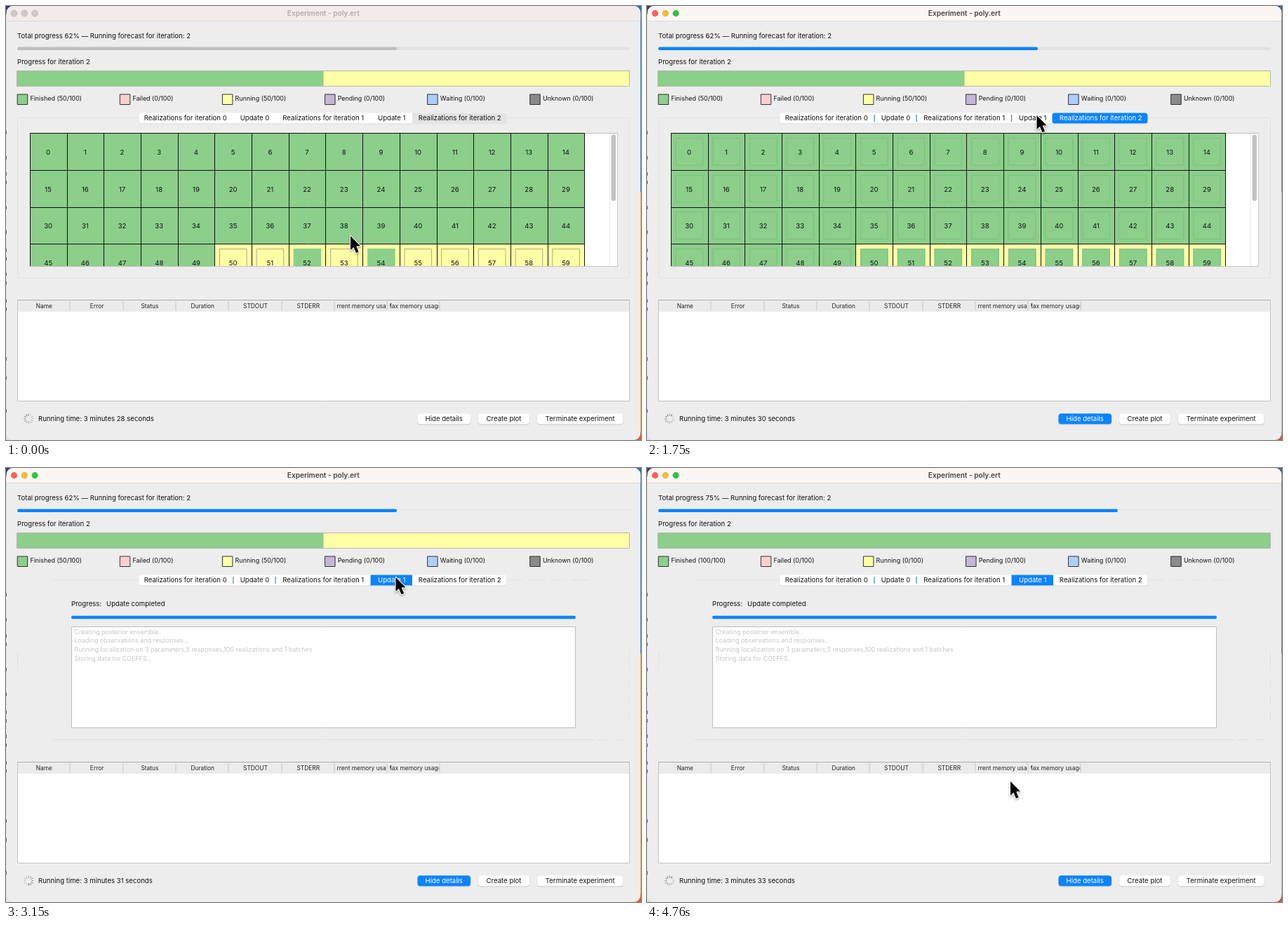
An HTML page with a canvas for the animation above (4.83 s loop, 905 by 619 pixels).

```html
<!DOCTYPE html>
<html lang="en">
<head>
<meta charset="utf-8">
<title>Experiment - poly.ert</title>
<style>
html, body { margin: 0; width: 100%; height: 100%; overflow: hidden; }
canvas { display: block; }
</style>
</head>
<body>
<canvas id="stage" width="905" height="619"></canvas>
<script>
const ctx = document.getElementById('stage').getContext('2d');
const LOOP = 4830, STEP = 70;
const ACTIVATE = 1680, TAB_CLICK = 1820, FINISH = 3290;
const GREEN = '#8bcf8b', YELLOW = '#ffffa5', BLUE = '#0b84fc', BODY = '#ededed';

function fill(x, y, w, h, color, radius = 0) {
  ctx.fillStyle = color;
  ctx.beginPath();
  ctx.roundRect(x, y, w, h, radius);
  ctx.fill();
}

function frame(x, y, w, h, color, radius = 0) {
  ctx.strokeStyle = color;
  ctx.lineWidth = 1;
  ctx.beginPath();
  ctx.roundRect(x, y, w, h, radius);
  ctx.stroke();
}

function line(x1, y1, x2, y2, color, width = 1) {
  ctx.strokeStyle = color;
  ctx.lineWidth = width;
  ctx.beginPath();
  ctx.moveTo(x1, y1);
  ctx.lineTo(x2, y2);
  ctx.stroke();
}

function text(str, x, y, { size = 9.6, align = 'left', color = '#111', weight = 400 } = {}) {
  ctx.font = `${weight} ${size}px Inter, sans-serif`;
  ctx.textAlign = align;
  ctx.fillStyle = color;
  ctx.fillText(str, x, y);
}

function clipped(x, y, w, h, draw) {
  ctx.save();
  ctx.beginPath();
  ctx.rect(x, y, w, h);
  ctx.clip();
  draw();
  ctx.restore();
}

function drawWindow(active) {
  fill(0, 0, 905, 619, '#dfe0e4');
  fill(0, 0, 12, 12, '#3d3c66');
  fill(893, 0, 12, 265, '#2d6da8');
  fill(893, 265, 12, 354, '#e8a04a');
  fill(893, 607, 12, 12, '#d9572f');
  for (const y of [180, 216, 239, 251, 287, 322, 348, 360, 382, 395, 420, 432, 503, 530, 577])
    fill(0, y - 2, 1, 5, '#444');
  fill(0.8, 0, 903.4, 619, BODY, 9);
  fill(0.8, 0, 903.4, 21.5, active ? '#fbf5f3' : '#f3ebea', [9, 9, 0, 0]);
  line(1, 21.5, 904, 21.5, active ? '#dcd8d7' : '#dedad9');

  ['#fe5f57', '#febb2e', '#28c840'].forEach((color, i) => {
    ctx.beginPath();
    ctx.arc(11.5 + i * 14.8, 10.5, 4.4, 0, 7);
    ctx.fillStyle = active ? color : '#cfc9c8';
    ctx.fill();
    ctx.lineWidth = 0.7;
    ctx.strokeStyle = active ? 'rgba(0,0,0,.15)' : '#b3adac';
    ctx.stroke();
  });
  text('Experiment - poly.ert', 452.3, 13.8,
    { size: 10.1, align: 'center', weight: 600, color: active ? '#444' : '#b0aaa9' });
}

function drawProgress(active, done, updateTab) {
  text(`Total progress ${done ? 75 : 62}% — Running forecast for iteration: 2`, 16, 46);
  if (updateTab) line(16, 59.5, 888, 59.5, '#e2e3e2');
  else fill(16, 58.5, 873, 4.5, '#e1e1e1', 2.2);
  fill(16, 58.5, done ? 655 : 541, 4.5, active ? BLUE : '#bfbfbf', 2.2);

  text('Progress for iteration 2', 16, 83.3);
  fill(16, 93, 873, 21, YELLOW);
  fill(16, 93, done ? 873 : 436.5, 21, GREEN);
  frame(15.5, 92.5, 873, 22, '#b5b5b0');

  const legend = [
    ['Finished', done ? 100 : 50, GREEN], ['Failed', 0, '#ffcfcf'],
    ['Running', done ? 0 : 50, YELLOW], ['Pending', 0, '#c5b5d8'],
    ['Waiting', 0, '#aeceff'], ['Unknown', 0, '#8a8a8a'],
  ];
  legend.forEach(([name, count, color], i) => {
    const x = 16 + i * 146.1;
    fill(x, 126, 15, 14.5, color);
    frame(x + 0.2, 126, 14.5, 14.5, '#333');
    text(`${name} (${count}/100)`, x + 18.4, 135, { size: 8.95 });
  });
}

function drawTabs(active, selected) {
  const edges = [189, 324, 384, 519.5, 579, 713.5];
  const names = ['Realizations for iteration 0', 'Update 0', 'Realizations for iteration 1',
    'Update 1', 'Realizations for iteration 2'];
  fill(188.7, 153.2, 525.2, 15, '#d2d2d2', 4);
  fill(189, 152.5, 524.5, 15, '#fff', 4);
  if (active) for (let i = 1; i < 4; i++)
    if (i !== selected) line(edges[i], 155, edges[i], 165, '#2f86d0', 1.2);
  const left = edges[selected] - (active && selected === 4 ? 1.5 : 0);
  fill(left, 152.5, edges[selected + 1] - left, 15, active ? BLUE : '#e3e3e3',
    selected === 4 ? [active ? 3 : 0, 4, 4, active ? 3 : 0] : 0);
  names.forEach((name, i) => text(name, (edges[i] + edges[i + 1]) / 2 + (i ? 0.5 : -0.8), 163.4,
    { align: 'center', color: active && i === selected ? '#fff' : '#111' }));
}

function drawRealizations(active) {
  const size = 52.7;
  frame(16.5, 159.5, 872, 228.5, '#e0e0e0', 4);
  fill(34, 181, 838, 190.5, '#fff');
  clipped(34, 181, 838, 190.5, () => {
    for (let n = 0; n < 60; n++) {
      const x = 34.3 + (n % 15) * size, y = 181.7 + Math.floor(n / 15) * size;
      const running = n >= 50;
      const innerGreen = !running || active || n === 52 || n === 54;
      fill(x, y, size, size, running ? YELLOW : GREEN);
      fill(x + 6.5, y + 6.3, 39.5, 39.5, innerGreen ? GREEN : YELLOW);
      if (!innerGreen || active)
        frame(x + 6.7, y + 6.8, 38.6, 38.6, innerGreen ? '#82bb82' : '#a9a98a');
      text(n, x + size / 2 - 0.5, y + 30.2, { align: 'center' });
    }
    for (let i = 0; i <= 15; i++) {
      const x = Math.floor(34.3 + i * size) + 0.5;
      line(x, 181, x, 372, '#111');
    }
    for (let r = 0; r < 4; r++) {
      const y = Math.floor(181.7 + r * size) + 0.5;
      line(34, y, 825, y, '#111');
    }
  });
  line(825, 181.5, 872, 181.5, '#bdbdbd');
  line(34, 371.5, 872, 371.5, '#c4c4c4');
  line(871.5, 181, 871.5, 372, '#c9c9c9');
  line(860.5, 182, 860.5, 371, '#e8e8e8');
  fill(862.6, 183.5, 6.4, 94.5, '#c2c2c2', 3.2);
}

function drawUpdate() {
  const faint = '#dfe0df';
  for (const [x, y, w] of [[67, 159.5, 122], [714, 159.5, 22], [744, 159.5, 24], [776, 159.5, 22],
    [807, 159.5, 25], [67, 387.5, 771], [843, 387.5, 14], [868, 387.5, 12]])
    line(x, y, x + w, y, faint);
  for (const [x, y, h] of [[16.5, 262, 26], [888.5, 260, 28], [888.5, 300, 13], [888.5, 324, 14],
    [888.5, 348, 14]])
    line(x, y, x, y + h, faint);
  text('Progress:', 93, 196.5);
  text('Update completed', 143, 196.5);
  fill(93, 210.7, 719, 4.6, BLUE, 2.2);
  fill(93, 226, 719, 145, '#fff');
  frame(93.5, 226.5, 718, 144, '#bfbfbf');
  ['Creating posterior ensemble..', 'Loading observations and responses..',
    'Running localization on 3 parameters,5 responses,100 realizations and 1 batches',
    'Storing data for COEFFS..',
  ].forEach((s, i) => text(s, 97.5, 236.7 + i * 12.75, { size: 8.95, color: '#c6c6c6' }));
}

function drawTable() {
  fill(16, 420, 873, 144, '#fff');
  fill(16, 420, 873, 16, '#ebebeb');
  frame(16.5, 419.5, 872, 144, '#c3c3c3');
  line(16, 419.5, 889, 419.5, '#adadad');
  ['Name', 'Error', 'Status', 'Duration', 'STDOUT', 'STDERR', 'Current memory usage',
    'Max memory usage',
  ].forEach((name, i) => {
    const x = 16.3 + i * 75.3;
    clipped(x + 3.5, 420, 69.8, 16, () =>
      text(name, x + 38, 431, { size: 8.4, align: 'center', color: '#222' }));
    const edge = Math.round(x + 75) + 0.5;
    line(edge - 0.5, 421, edge - 0.5, 434.5, '#c6c6c6');
  });
}

function drawSpinner(t) {
  const head = t < ACTIVATE ? 0 : Math.floor((t - 4375) / 84.5 + 9 + 120);
  for (let i = 0; i < 12; i++) {
    const age = (((head - i) % 12) + 12) % 12;
    const a = i * Math.PI / 6, s = Math.sin(a), c = -Math.cos(a);
    line(32.2 + s * 4, 588.6 + c * 4, 32.2 + s * 7.2, 588.6 + c * 7.2,
      `rgba(90,90,90,${0.75 - age * 0.05})`, 1.1);
  }
}

function drawFooter(t, active) {
  const seconds = !active ? 28 : t < 2660 ? 30 : 31 + Math.floor((t - 2660) / 1000);
  drawSpinner(t);
  text(`Running time: 3 minutes ${seconds} seconds`, 46, 592);
  [['Hide details', 586.5, 75.5], ['Create plot', 673, 73], ['Terminate experiment', 757, 122.5]]
    .forEach(([label, x, w], i) => {
      const primary = active && i === 0;
      fill(x - 0.4, 581.5, w + 0.8, 16, '#d0d0d0', 4);
      fill(x, 581.3, w, 15, primary ? BLUE : '#fff', 4);
      text(label, x + w / 2, 592.1, { align: 'center', color: primary ? '#fff' : '#111' });
    });
}

function pointer(t) {
  const points = [[491, 328], [555.5, 156], [518, 447]];
  const [from, start, length] = t < 3430 ? [0, 0, 600] : [1, 3430, 420];
  const p = Math.min(1, (t - start) / length);
  const e = p * p * (3 - 2 * p);
  return points[from].map((v, i) => v + (points[from + 1][i] - v) * e);
}

function drawPointer(t) {
  const [x, y] = pointer(t);
  ctx.save();
  ctx.translate(x, y);
  ctx.beginPath();
  ctx.moveTo(0, 0);
  for (const [px, py] of [[0, 20], [4.4, 16], [8, 24.3], [11.6, 22.8], [8.2, 14.6], [14, 14.2]])
    ctx.lineTo(px, py);
  ctx.closePath();
  ctx.shadowColor = 'rgba(0,0,0,.35)';
  ctx.shadowBlur = 3;
  ctx.shadowOffsetY = 1.5;
  ctx.lineJoin = 'round';
  ctx.lineWidth = 2.2;
  ctx.strokeStyle = '#fff';
  ctx.stroke();
  ctx.shadowColor = 'transparent';
  ctx.fillStyle = '#000';
  ctx.fill();
  ctx.restore();
}

function render(now) {
  const t = Math.floor((now % LOOP) / STEP) * STEP;
  const active = t >= ACTIVATE, updateTab = t >= TAB_CLICK;
  drawWindow(active);
  drawProgress(active, t >= FINISH, updateTab);
  if (updateTab) drawUpdate();
  else drawRealizations(active);
  drawTabs(active, updateTab ? 3 : 4);
  drawTable();
  drawFooter(t, active);
  drawPointer(t);
  requestAnimationFrame(render);
}
requestAnimationFrame(render);
</script>
</body>
</html>
```
